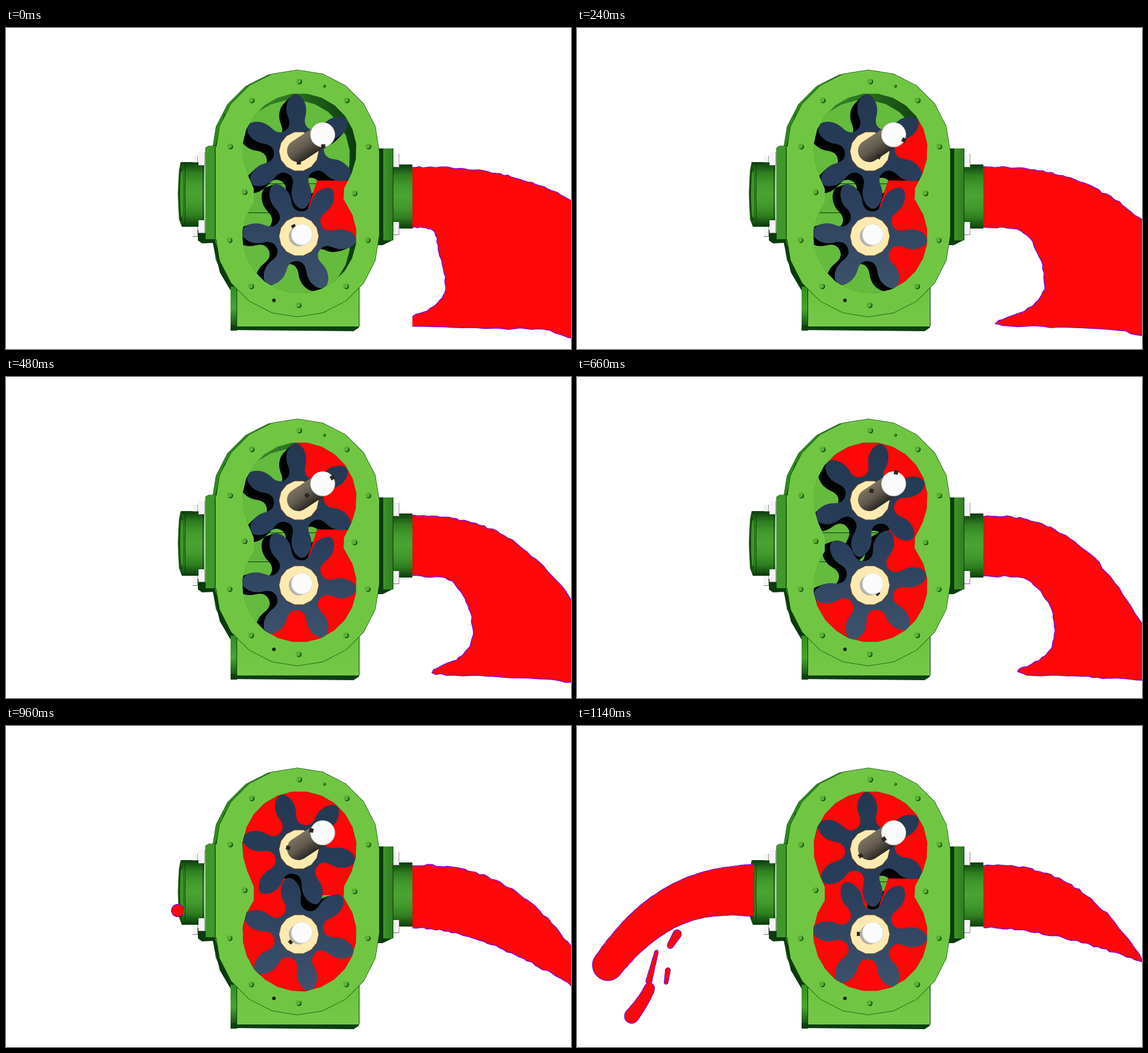
An HTML page with a canvas for the animation above (1200 ms loop, 951 by 541 pixels).

```html
<!DOCTYPE html>
<html>
<head>
<meta charset="utf-8">
<title>Gear pump</title>
<style>
html, body { margin: 0; width: 100%; height: 100%; overflow: hidden; background: #fff; }
canvas { display: block; }
</style>
</head>
<body>
<canvas id="stage" width="951" height="541"></canvas>
<script>
const c = document.getElementById('stage').getContext('2d');
const RAD = Math.PI / 180, RED = '#fd0709', PURPLE = '#8508d8', GREEN = '#70c643', DARK = '#0b3b0d';
const UP = [493, 208], LOW = [493, 351];

const mix = (a, b, u) => a + (b - a) * u;
const hash = i => { const v = Math.sin(i * 127.1) * 43758.5453; return v - Math.floor(v) - 0.5; };

function path(p) {
  c.beginPath();
  for (let i = 0; i < p.length; i += 2) c.lineTo(p[i], p[i + 1]);
  c.closePath();
}
function poly(p, fill, edge, width = 1) {
  path(p);
  if (edge) { c.strokeStyle = edge; c.lineWidth = width; c.stroke(); }
  c.fillStyle = fill; c.fill();
}
function rect(x, y, w, h, fill) { c.fillStyle = fill; c.fillRect(x, y, w, h); }
function disc(x, y, r, fill, ry = r) {
  c.beginPath(); c.ellipse(x, y, r, ry, 0, 0, 7); c.fillStyle = fill; c.fill();
}
function line(x1, y1, x2, y2, col = DARK) {
  c.beginPath(); c.moveTo(x1, y1); c.lineTo(x2, y2);
  c.strokeStyle = col; c.lineWidth = 1; c.stroke();
}
function blend(x1, y1, x2, y2, ...cols) {
  const g = c.createLinearGradient(x1, y1, x2, y2);
  cols.forEach((col, i) => g.addColorStop(i / (cols.length - 1), col));
  return g;
}
function clipped(x, y, w, h, draw) {
  c.save();
  c.beginPath(); c.rect(x, y, w, h); c.clip();
  draw();
  c.restore();
}
function arc(x, y, r, from, to, n) {
  const p = [];
  for (let i = 0; i <= n; i++) {
    const a = mix(from, to, i / n) * RAD;
    p.push(x + r * Math.cos(a), y + r * Math.sin(a));
  }
  return p;
}

const capsule = (x, r) => [...arc(x, 208.5, r, -180, 0, 10), ...arc(x, 349, r, 0, 180, 10)];
const PLATE = capsule(490.5, 137.5);
const CAVITY = [...arc(494, 206, 96, 156, 384, 15), 569, 270, 568, 288,
  ...arc(494, 351, 96, -22, 202, 15), 417, 294, 417, 270];

// Closed smooth outline with a slightly ragged edge
function liquid(p, seed) {
  const n = p.length / 2, out = [], at = (i, k) => p[((i + n) % n) * 2 + k];
  for (let i = 0; i < n; i++) for (let j = 0; j < 8; j++) {
    const t = j / 8;
    for (let k = 0; k < 2; k++) {
      const a = at(i - 1, k), b = at(i, k), d = at(i + 1, k), e = at(i + 2, k);
      const v = b + t * ((d - a) / 2 + t * (a - 2.5 * b + 2 * d - e / 2 + t * (1.5 * (b - d) + (e - a) / 2)));
      out.push(v + 3 * hash(seed * 200 + i * 17 + j * 2 + k));
    }
  }
  c.lineJoin = 'round';
  poly(out, RED, PURPLE, 3);
}

// Bending strand that grows or tapers from radius r0 to r1
function strand(x0, y0, x1, y1, r0, r1, bend = 1, wobble = 1) {
  for (const [extra, col] of [[1.3, PURPLE], [0, RED]])
    for (let i = 0; i <= 60; i++) {
      const u = i / 60;
      disc(mix(x0, x1, u), mix(y0, y1, u ** bend), mix(r0, r1, u) + extra + wobble * hash(i), col);
    }
}

// step, height of the top edge at the stage border, x of the foot, x of the inner bend
const FALL = [[0, 291, 663, 742], [4, 325, 706, 789], [8, 375, 718, 788], [11, 418, 744, 806], [13, 415, 801, 832]];

function rightJet(s) {
  const flying = s > 13;
  const i = Math.max(0, FALL.findLastIndex(k => k[0] <= Math.min(s, 12)));
  const [a, b] = [FALL[i], FALL[i + 1]];
  const [, edge, foot, bend] = a.map((v, k) => mix(v, b[k], (s - a[0]) / (b[0] - a[0])));
  const top = flying ? 372 + 7 * (s - 16) : edge, low = 436 - 13 * (s - 16);
  const curve = (y0, y1, power) => [0, 0.2, 0.4, 0.6, 0.8, 1, 1.1].flatMap(u => [684 + 267 * u, mix(y0, y1, u ** power)]);
  const under = curve(338, low, 1.7);
  const back = [];
  for (let k = under.length - 2; k >= 0; k -= 2) back.push(under[k], under[k + 1]);
  const lower = flying ? back : [975, 508, 900, 507, foot + 90, 503, foot, 498, mix(foot, bend, 0.65), 474,
    bend - 2, 440, bend - 10, 385, mix(684, bend, 0.6), 341, 684, 335];
  clipped(684, 0, 267, 541, () =>
    liquid([650, 235, ...curve(235, top, 2.6), ...lower, 650, 335], s));
}

function leftJet(s) {
  if (s < 16) return;
  const g = (s - 16) / 3, x = 289 + 9 * g, y = mix(311, 277, g);
  clipped(0, 0, 298, 541, () =>
    strand(x, y, x - 246 * g ** 2.3, y + 126 * g, 9 + 34 * g, 9 + 16 * g, 2.6));
  if (s < 19) return;
  strand(169, 350, 157, 370, 6, 4);
  strand(134, 380, 121, 430, 2, 4);
  strand(153, 411, 150, 432, 3, 2);
  strand(122, 441, 92, 489, 8, 11, 0.8);
}

function housing() {
  poly(capsule(483, 136), '#2c8b1c', '#103c10');
  line(368, 145, 351, 205); line(350, 365, 372, 428);
  poly([352,360, 366,400, 386,435, 380,446, 360,412, 348,362], DARK);
  poly([359,195, 370,155, 398,110, 380,130, 362,165, 353,200], DARK);
  rect(378, 436, 11, 74, blend(0, 436, 0, 510, '#2f8f20', '#46a52f', '#0c3b0d'));
  poly([378,501, 594,503, 594,505, 585,511, 378,509], '#0c3f10');
  rect(388, 430, 206, 73, blend(0, 430, 0, 503, '#6ac33d', '#76c848'));
  line(388.5, 436, 388.5, 503); line(594.5, 436, 594.5, 503);
}

function bolt(x, y, w, h) {
  rect(x, y, w, h, '#f4f4f4');
  line(x, y + h - 0.5, x + w, y + h - 0.5, '#777');
  line(x + w - 0.5, y, x + w - 0.5, y + h, '#999');
}

function ports(s) {
  const tube = y => blend(0, y, 0, y + 108, DARK, '#2f7f20', '#429a2d', '#4aa333', '#429a2d', '#2f7f20', DARK);
  rect(651, 230, 33, 108, tube(230));
  rightJet(s);
  poly([627,203, 636,203, 636,358, 650,358, 634,366, 626,366], DARK);
  rect(635, 203, 16, 155, blend(635, 0, 651, 0, '#3d9329', '#317d22'));
  line(651.5, 203, 651.5, 358);
  bolt(652, 212, 10, 23); bolt(652, 327, 10, 22);

  poly([294,226, 334,226, 334,335, 296,335, 291,322, 289,280, 291,240], tube(226));
  disc(295, 280, 5, '#14490f', 46);
  disc(296, 280, 3, '#3d9526', 40);
  line(301.5, 230, 301.5, 332); line(331.5, 228, 331.5, 334);
  leftJet(s);
  poly([323,340, 352,352, 352,362, 330,363, 323,358], DARK);
  poly([336,202, 341,199, 353,199, 353,356, 336,356], '#3f9829', DARK);
  line(352, 200, 352, 356);
  bolt(324, 209, 11, 23); bolt(314, 215, 9, 12);
  bolt(324, 324, 11, 22); bolt(314, 335, 9, 17);
}

function hole(x, y) {
  disc(x, y, 4.5, '#174c12');
  disc(x - 1.5, y - 1, 4, '#5ab034');
}
function plate() {
  poly(PLATE, GREEN, '#164c12', 1.5);
  rect(353, 200, 7, 156, GREEN);
  for (let k = -2; k <= 2; k++) {
    const x = 116.5 * Math.sin(43.3 * k * RAD), y = 116.5 * Math.cos(43.3 * k * RAD);
    hole(494 + x, 207 - y); hole(493 + x, 351 + y);
  }
  hole(402, 277); hole(587, 279);
  disc(536, 98, 2.5, '#174c12'); disc(535, 97.5, 1.6, '#5ab034');
  disc(451, 459, 3, '#062508');
}

function gear([x, y], turn, fill) {
  c.beginPath();
  for (let k = 0; k < 6; k++) {
    const a = (turn + 60 * k) * RAD, co = Math.cos(a), si = Math.sin(a);
    const at = (u, v) => [x + u * co - v * si, y + u * si + v * co];
    c.lineTo(...at(36.4, -21));
    c.bezierCurveTo(...at(41, -13), ...at(49, -11), ...at(60, -15));
    c.bezierCurveTo(...at(79, -21), ...at(96, -10), ...at(97, 0));
    c.bezierCurveTo(...at(96, 10), ...at(79, 21), ...at(60, 15));
    c.bezierCurveTo(...at(49, 11), ...at(41, 13), ...at(36.4, 21));
  }
  c.closePath();
  c.fillStyle = fill; c.fill();
}

function sector([x, y], from, to, top, height) {
  clipped(380, top, 230, height, () => {
    c.beginPath(); c.moveTo(x, y);
    c.arc(x, y, 150, from * RAD, to * RAD, to < from);
    c.fillStyle = RED; c.fill();
  });
}

// Fluid follows each leading tooth round the wall; the gears mesh in four repeating poses
function chamber(n) {
  const up = 26.5 - 15 * n, low = 4 + 15 * n, pose = n % 4;
  c.save();
  path(CAVITY); c.clip();
  rect(390, 100, 210, 360, blend(450, 0, 590, 0, '#347f25', DARK));
  c.translate(-11, 11);
  poly(CAVITY, '#65bb3d', '#1c5a16');
  c.translate(11, -11);
  rect(398, 262, 190, 49, '#60b53a');
  line(408, 262.5, 568, 262.5); line(408, 311.5, 470, 311.5);
  for (let i = 6; i > 0; i--) {
    gear([UP[0] - 2 * i, UP[1] + 2 * i], up, '#010302');
    gear([LOW[0] - 2.2 * i, LOW[1] + 0.8 * i], low, '#010302');
  }
  sector(UP, [26.5, 71, 56, 41][pose], Math.max(up, -265), 100, 185);
  sector(LOW, [-72, -45, -26, -71][pose], Math.min(low, 265), 257, 200);
  const steel = blend(0, 110, 0, 445, '#233850', '#293e5b', '#3d536c');
  gear(UP, up, steel);
  gear(LOW, low, steel);
  c.restore();
}

function notch(x, y, r, deg) {
  c.save();
  c.translate(x, y); c.rotate(deg * RAD);
  rect(r - 4, -3.5, 7, 7, '#2c2820');
  c.restore();
}
function shafts(n) {
  const upKey = 87 - 15 * n, lowKey = -118 + 15 * n;
  for (const [x, y] of [UP, LOW]) poly(arc(x, y, 33, 0, 360, 14), '#fdeab0', '#6b4a2c', 2);
  c.lineCap = 'round'; c.lineWidth = 38;
  c.strokeStyle = blend(496, 180, 518, 212, '#7d7461', '#625b4f', '#2b2924');
  c.beginPath(); c.moveTo(492, 207); c.lineTo(530, 182); c.stroke();
  c.lineCap = 'butt';
  notch(492, 209, 18, upKey);
  disc(533, 180, 21, '#d0d0cc');
  disc(533, 179.5, 20, '#fbfbfb');
  notch(533, 180, 20, upKey);
  notch(493, 351, 19, lowKey);
  disc(493, 351, 17, '#b2b1aa');
  disc(498, 348.5, 18, '#dededb');
  disc(498, 348, 17, '#fbfbfb');
}

const start = performance.now();
function frame() {
  const s = Math.floor((performance.now() - start) % 1200 / 60);
  const n = s > 14 ? s + 1 : s; // the gears skip one position late in the loop
  c.clearRect(0, 0, 951, 541);
  housing();
  ports(s);
  plate();
  chamber(n);
  shafts(n);
  requestAnimationFrame(frame);
}
frame();
</script>
</body>
</html>
```
